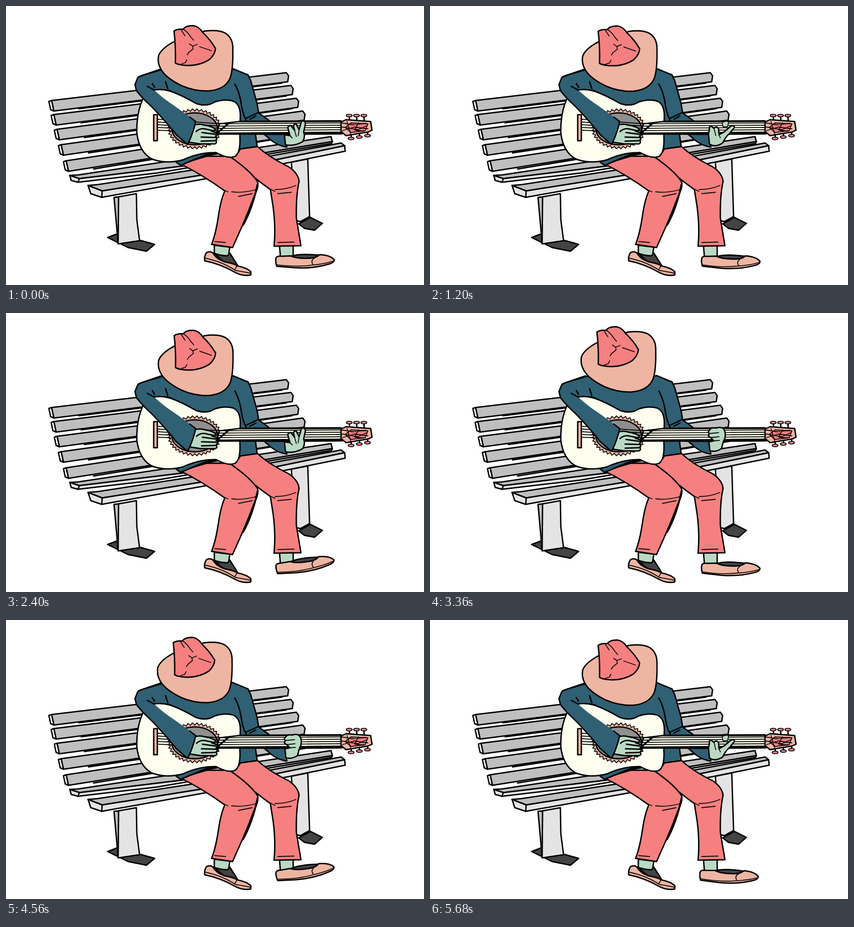
Animation of 917 by 611 pixels, one loop 5760 ms. Source, as an HTML page:

```html
<!DOCTYPE html>
<html lang="en">
<head>
<meta charset="utf-8">
<title>Guitarist on a bench</title>
<style>
html, body { margin: 0; width: 100%; height: 100%; overflow: hidden; background: #fff }
svg { display: block; width: 917px; height: 611px }
path, ellipse { stroke: #000; stroke-width: 3; stroke-linejoin: round; stroke-linecap: round; fill: none }
.thin, .thin path { stroke-width: 1.8 }
.thick { stroke-width: 4 }
.grey { fill: #bfbfbf } .light { fill: #e4e4e4 } .white { fill: #fff } .dark { fill: #444 }
.hole { fill: #8f8f8f } .blue { fill: #306073 } .red { fill: #f68080 } .peach { fill: #eeb5a2 }
.skin { fill: #bad9c4 } .cream { fill: #fffff0 }
</style>
</head>
<body>
<svg viewBox="0 0 917 611">
  <g id="slats"></g>

  <!-- bench legs and seat -->
  <path class="dark" d="M642 477L668 463L694 476L677 491L655 487Z"/>
  <path class="light" d="M626 342L662 335L666 461L646 472L636 470Z"/>
  <path class="dark" d="M223 507L244 499L290 512L326 522L308 537L268 529Z"/>
  <path class="grey" d="M237 419L248 418L246 520Z"/>
  <path class="light" d="M247 418L286 411L287 468L293 514L246 521Z"/>
  <path class="grey" d="M140 371L158 370L713 286L716 297L400 349L161 378Z"/>
  <path class="light" d="M140 371L161 378L400 349L716 297L714 301L330 366L158 386L143 382Z"/>
  <path class="grey" d="M180 393L202 391L430 356L735 300L743 306L425 371L211 405Z"/>
  <path class="light" d="M180 393L211 405L425 371L743 306L744 318L620 343L440 378L210 419L186 411Z"/>
  <path d="M211 405L210 419M161 378L158 386"/>

  <!-- planted foot, tapping foot -->
  <path class="skin" d="M457 524L491 528L488 548L457 546Z"/>
  <path class="dark" d="M455 541Q470 547 486 547L491 541L508 568L480 562Z"/>
  <path class="peach" d="M440 540Q448 536 454 541Q464 558 488 562Q502 565 507 569Q530 574 537 582L537 589Q520 593 500 582Q470 565 436 558Q434 549 440 540Z"/>
  <path class="thin" d="M436 552Q475 560 503 579L536 585M507 569L502 577"/>
  <path class="skin" d="M600 524L630 524L630 550L602 550Z"/>
  <g id="foot">
    <path class="dark" d="M624 548Q645 541 686 545L690 550L642 556Z"/>
    <path class="peach" d="M592 553Q593 547 605 548L624 547Q637 553 662 552Q680 552 688 544Q712 545 720 555Q720 561 710 564Q675 575 635 573L594 570Q591 561 592 553Z"/>
    <path class="thin" d="M594 567Q640 572 671 567Q700 564 717 558M673 565Q668 557 676 552"/>
  </g>

  <!-- trousers -->
  <path class="red" d="M490 329L515 311L551 307Q575 330 620 352Q641 366 643 384Q636 415 637 465L647 525L588 526Q592 485 586 440L580 402Q535 370 490 329Z"/>
  <path class="red" d="M383 346L440 329L490 329Q536 360 552 385Q555 397 545 415Q532 450 518 482L497 529L451 522Q460 500 466 460Q471 425 480 405Q430 369 383 346Z"/>
  <path class="thick" d="M552 390Q540 445 520 480"/>
  <path class="thin" d="M476 402L487 407M495 407Q520 410 549 402M510 417L540 411M578 400L590 406M590 402Q615 402 636 393M596 411L626 408M458 516L482 518M596 518L632 517"/>

  <!-- jumper -->
  <path class="blue" d="M284 170L291 155L340 138L420 150L497 137L531 151L537 164L551 214L554 234L580 253L612 280L616 309Q592 305 575 288L545 264L551 308L514 313L510 320L440 325L383 349L372 341L300 200Z"/>
  <path d="M502 171Q513 190 517 220Q521 243 531 257M526 246L552 234M535 248L548 241"/>

  <!-- guitar -->
  <path class="cream" d="M300 204Q286 235 287 278Q292 320 320 335Q350 347 388 337Q425 320 461 321Q488 336 503 329Q515 320 513 285L514 240Q514 215 498 208Q480 203 458 210Q440 222 416 213Q385 195 362 187Q342 181 318 183Q308 189 300 204Z"/>
  <path id="rosette" class="peach thin"/>
  <ellipse class="hole" cx="414" cy="269" rx="50" ry="35"/>
  <path class="peach" d="M324 238L332 238L332 295L324 295Z"/>
  <path class="cream" d="M468 258L512 253L735 252L737 280L600 281L462 280Z"/>
  <g class="thin" id="strings"></g>
  <path class="thick" d="M462 280L735 279M512 253L735 252M466 276L488 257"/>
  <g id="pegs"></g>
  <path class="peach" d="M735 254L746 249L800 253L803 272L794 276L746 284L735 275Z"/>
  <path class="red thin" d="M744 266L757 256L794 258L788 273L757 277Z"/>
  <path class="thin" d="M736 256L760 260L790 257M737 265L772 271L792 262M738 273L764 265L794 269M748 253L756 280M773 256L765 272L785 274"/>

  <!-- strumming hand and arm -->
  <g id="strum">
    <path class="skin" d="M405 264Q421 256 436 261Q450 263 457 268Q463 273 450 274L459 277Q465 281 460 285Q465 290 460 294Q464 300 458 302L426 302L400 298Z"/>
    <path d="M417 275Q426 266 440 270L455 273M430 277L459 281M428 287L460 288M428 296L459 295"/>
  </g>
  <path class="blue" d="M340 140Q315 147 299 152L289 157L283 172L286 185Q298 201 320 221Q348 250 374 282L398 303Q404 293 409 278Q414 264 416 253Q390 233 370 219Q345 203 325 184L356 180Z" stroke-dasharray="315 400"/>
  <path d="M310 176L325 184Q341 181 362 186M321 170L326 178M350 166L355 181"/>

  <!-- fretting hand, one shape per chord -->
  <g class="chord">
    <path class="skin" d="M611 282L613 304Q632 308 651 297Q657 286 653 276L657 257Q655 250 648 253L643 271L637 259Q631 256 631 265L633 272L625 262Q617 261 619 270L623 284Z"/>
    <path class="thin" d="M623 284L628 289M633 272L637 286M643 271L641 284"/>
  </g>
  <g class="chord">
    <path class="skin" d="M611 280L613 302Q625 311 642 300Q648 287 658 278L668 266Q667 260 660 263L645 276L634 282L633 268Q627 262 623 268L618 264Q611 263 613 270Z"/>
    <path class="skin thin" d="M641 256Q648 250 655 254L653 264L643 265Z"/>
    <path class="thin" d="M623 268L627 284M634 282L637 289"/>
  </g>
  <g class="chord">
    <path class="skin" d="M612 282L614 302Q630 305 640 296Q642 284 647 274Q650 258 642 252Q635 249 628 252Q616 250 613 257Q608 260 613 264Q608 270 616 273L623 280Z"/>
    <path class="thin" d="M613 264L633 262M615 273L634 271M622 280L635 279"/>
  </g>

  <g id="hat">
    <path class="peach" d="M336 111Q342 95 370 80L437 57Q466 53 482 61Q500 72 499 97Q500 140 493 160Q482 185 446 188Q415 189 388 177Q352 160 341 140Q333 126 336 111Z"/>
    <path class="red" d="M373 127Q374 90 370 57Q376 52 390 53Q395 45 412 45Q425 47 433 60Q450 76 461 95Q460 108 448 119Q425 134 395 132Q380 131 373 127Z"/>
    <path class="thin" d="M386 55L394 67M391 53Q401 60 406 69L413 77M404 85L411 90L421 86M411 90L412 96L402 104L399 109M426 91L452 100M398 120L395 126L386 129"/>
  </g>
</svg>
<script>
const STEP = 80, LOOP = 72, NOD = 18, BEAT = 9;
const TURN = 2 * Math.PI;
const el = id => document.getElementById(id);
const line = (x1, y1, x2, y2) => `<path d="M${x1} ${y1}L${x2} ${y2}"/>`;
const repeat = (count, part) => Array.from({ length: count }, (_, i) => part(i)).join('');
const move = (x, y) => `translate(${x} ${y})`;

// Back rest: the gaps widen towards the seat
el('slats').innerHTML = repeat(5, i => {
  const x = 100 + 4 * i + i * i, y = 207 + 30 * i + 0.75 * i * i;
  const endX = 615 + 9 * i + i * i, endY = 146 + 28 * i;
  return `
    <path class="grey" d="M${x} ${y}L${endX} ${endY}l5 7l-2 13L${x + 5} ${y + 23}Z"/>
    <path class="white" d="M${x - 6} ${y + 2}l6 -2l5 23l-7 -3Z"/>
    ${line(x + 60, y + 18, endX - 10, endY + 23)}`;
});

// Saw-toothed ring around the sound hole
el('rosette').setAttribute('d', repeat(72, i => {
  const a = i / 72 * TURN, tooth = i % 2 * 5;
  return `${i ? 'L' : 'M'}${414 + (54 + tooth) * Math.cos(a)} ${269 + (39 + tooth) * Math.sin(a)}`;
}) + 'Z');

el('strings').innerHTML = repeat(5, i =>
  line(333, 248 + i * 6, 470, 258 + i * 5) + line(470, 258 + i * 5, 738, 256 + i * 5));

const peg = (x, y) => line(x, y, x + 2, 265) +
  `<ellipse class="red thin" cx="${x}" cy="${y}" rx="6.5" ry="2.8"/>`;
el('pegs').innerHTML = repeat(3, i => peg(753 + 16 * i, 240) + peg(757 + 18 * i, 290 - 3 * i));

const chordOrder = [0, 1, 2, 0, 2, 0, 2, 1];
const chords = document.querySelectorAll('.chord');

// The nods grow deeper, and the second one goes straight up
function nod(step) {
  const lift = (1 - Math.cos((step + 2) / NOD * TURN)) / 2;
  const depth = 12 + 3.5 * Math.cos((step - 33) / LOOP * TURN);
  const sway = 3.5 * (1 - Math.max(0, Math.cos((step - 26) / LOOP * TURN)));
  return move(-1 - sway * lift, -1 - depth * lift);
}

function tap(step) {
  const tilt = -1.5 - 5.5 * Math.sin((step - 0.5) / BEAT * TURN);
  const slide = 5 * Math.max(0, Math.cos((step - 5) / BEAT * TURN));
  return `${move(slide, 0)} rotate(${tilt} 600 560)`;
}

function draw() {
  const step = Math.floor(performance.now() / STEP) % LOOP;
  el('hat').setAttribute('transform', nod(step));
  el('foot').setAttribute('transform', tap(step));
  el('strum').setAttribute('transform', step % 36 < 18 ? '' : move(1, -5));
  const chord = chordOrder[Math.floor(step / BEAT)];
  chords.forEach((hand, i) => hand.style.display = i === chord ? '' : 'none');
  requestAnimationFrame(draw);
}
draw();
</script>
</body>
</html>
```
